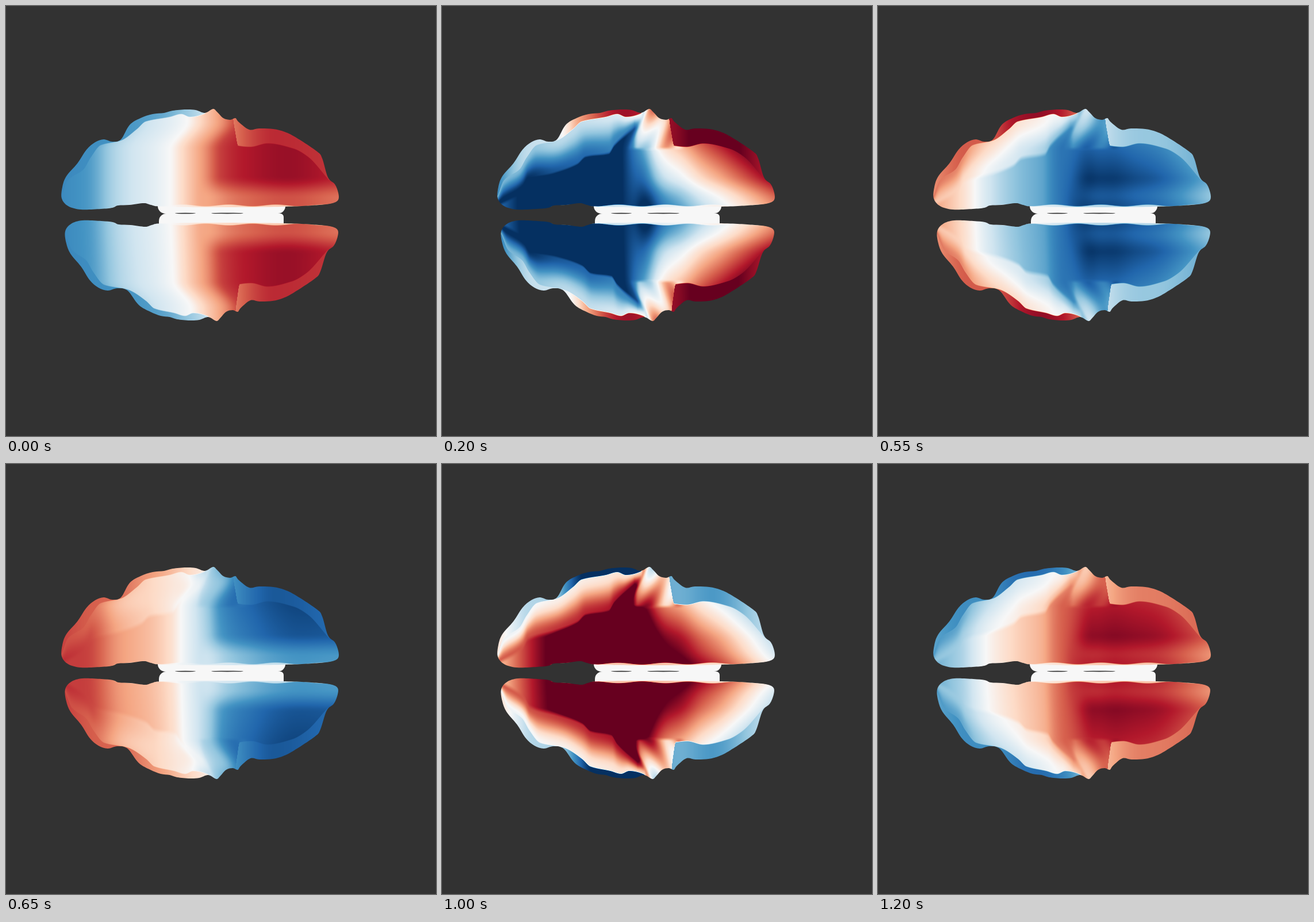
Animation, 748 px wide and 748 px high, one loop 1.25 s. Source, as an HTML page with a canvas:

```html
<!DOCTYPE html>
<html lang="en">
<head>
<meta charset="utf-8">
<title>Wave travelling over two hemispheres</title>
<style>
  html, body { margin: 0; width: 100%; height: 100%; overflow: hidden; background: #323232; }
  canvas { display: block; width: 748px; height: 748px; }
</style>
</head>
<body>
<canvas id="stage" width="748" height="748"></canvas>
<script>
const LOOP = 1250, STEP = 50, BG = '#323232', WHITE = '#f7f7f7';
const AXIS = 363.5, BOX = { x: 88, y: 172, w: 504, h: 384 };
const ctx = document.getElementById('stage').getContext('2d');

const mix = (a, b, t) => a + (b - a) * t;
const bell = t => Math.exp(-t * t);
const ramp = (from, to, v) => {
  const t = Math.max(0, Math.min(1, (v - from) / (to - from)));
  return t * t * (3 - 2 * t);
};

// Monotone cubic through a few [x, y] points
function track(...pts) {
  const rise = pts.slice(1).map((p, i) => (p[1] - pts[i][1]) / (p[0] - pts[i][0]));
  const slope = pts.map((_, i) => {
    const a = rise[i - 1] ?? rise[i], b = rise[i] ?? a;
    return a * b > 0 ? 2 * a * b / (a + b) : 0;
  });
  return x => {
    let i = 0;
    while (i < pts.length - 2 && x > pts[i + 1][0]) i++;
    const [x0, y0] = pts[i], [x1, y1] = pts[i + 1], h = x1 - x0;
    const t = Math.max(0, Math.min(1, (x - x0) / h)), u = 1 - t;
    return y0 * (1 + 2 * t) * u * u + y1 * t * t * (3 - 2 * t) + h * t * u * (slope[i] * u - slope[i + 1] * t);
  };
}

// Diverging colour scale, blue (-1) to red (+1)
const STOPS = ['053061', '2166ac', '4393c3', '92c5de', 'd1e5f0', 'f7f7f7',
  'fddbc7', 'f4a582', 'd6604d', 'b2182b', '67001f']
  .map(h => [0, 2, 4].map(i => parseInt(h.slice(i, i + 2), 16)));
const SHADES = 1001;
const palette = Uint32Array.from({ length: SHADES }, (_, i) => {
  const p = i / (SHADES - 1) * 10, k = Math.min(9, Math.floor(p));
  const [r, g, b] = STOPS[k].map((c, j) => Math.round(mix(c, STOPS[k + 1][j], p - k)));
  return (255 << 24 | b << 16 | g << 8 | r) >>> 0;
});

// Upper silhouette; the lower one is its mirror image, slightly skewed
const outline = [
  [97, 335], [98, 315], [105, 296], [124, 274], [140, 250], [155, 237], [170, 232], [185, 236],
  [200, 232], [215, 207], [234, 195], [255, 188], [275, 186], [290, 182], [313, 180], [330, 181],
  [346, 186], [360, 179], [367, 184], [378, 195], [390, 198], [399, 195], [405, 202], [423, 215],
  [440, 213], [465, 214], [485, 219], [505, 229], [541, 253], [550, 265], [560, 298], [572, 310],
  [578, 325], [578, 337], [568, 343], [545, 346], [486, 349], [360, 350], [272, 349], [252, 346],
  [240, 343], [215, 346], [195, 347], [185, 351], [165, 353], [130, 354], [108, 348]];
const skew = (x, y) => (AXIS - y) * (.035 * Math.tanh((450 - x) / 60) + .07 * bell((x - 225) / 45))
  + 5 * bell((x - 97) / 40);
const mirrored = outline.map(([x, y]) => [x + skew(x, y), 2 * AXIS - y]);

// Closed Catmull-Rom curve
function trace(path, pts) {
  const n = pts.length;
  path.moveTo(...pts[0]);
  pts.forEach((b, i) => {
    const a = pts[(i + n - 1) % n], c = pts[(i + 1) % n], d = pts[(i + 2) % n];
    path.bezierCurveTo(b[0] + (c[0] - a[0]) / 6, b[1] + (c[1] - a[1]) / 6,
      c[0] - (d[0] - b[0]) / 6, c[1] - (d[1] - b[1]) / 6, ...c);
  });
  path.closePath();
}
const silhouette = new Path2D();
trace(silhouette, outline);
trace(silhouette, mirrored);

// Contours of the relief: the crest hides the far side, the terrace bounds the plateau
const crest = track([97, 330], [108, 303], [135, 284], [147, 264], [165, 242], [200, 234],
  [228, 214], [243, 201], [285, 193], [305, 188], [320, 193], [346, 187], [353, 165], [390, 170],
  [398, 215], [404, 243], [425, 245], [455, 239], [500, 248], [525, 262], [562, 303]);
const terrace = track([97, 345], [140, 318], [150, 302], [195, 290], [235, 275], [250, 262],
  [290, 255], [300, 240], [335, 207]);

// Cosine and sine parts of the wave along x, for the near and the far side
const nearCos = track([97, -.64], [140, -.58], [195, -.28], [285, 0], [305, .18], [345, .45],
  [375, .7], [415, .8], [490, .87], [578, .78]);
const nearSin = track([97, -.5], [155, -1], [195, -1.25], [250, -1.5], [310, -1.35], [340, -1.17],
  [375, -1.06], [410, -.92], [450, -.62], [490, -.37], [578, .3]);
const farCos = track([97, -.65], [250, -.55], [340, -.25], [400, .55], [470, .75], [575, .72]);
const farSin = track([97, -.35], [150, .1], [190, .15], [240, .85], [310, 1.25], [400, .7],
  [470, .85], [575, .45]);

function wave(x, y) {
  const top = crest(x), edge = terrace(x), base = nearSin(x);
  const diagonal = x + (y - 180) / 2;

  let c = nearCos(x - 30 * ramp(250, 200, y));
  c -= .23 * ramp(330, 375, x) * ramp(295, 335, y);

  const flank = mix(-.15, -.85, ramp(0, 1, (y - top) / Math.max(10, edge - top)));
  const rear = mix(flank, base, ramp(-3, 8, y - edge));

  const folds = .3 * Math.cos((diagonal - 364) * Math.PI / 29)
    * ramp(330, 342, x) * ramp(425, 405, x) * ramp(252, 244, y);
  const ledge = .3 * bell((x - 355) / 22) * ramp(244, 253, y);
  const front = base + .0085 * ramp(310, 375, x) * (335 - y) + folds - ledge;

  let s = mix(rear, front, ramp(350, 362, diagonal));

  const far = ramp(-1, 1, top - y);
  c = mix(c, farCos(x), far);
  s = mix(s, farSin(x), far);

  // Pale lip along the inner border
  const lip = ramp(-1, 1, y - 347 - 1.5 * Math.sin(x / 13)) * ramp(186, 196, x);
  return [mix(c, c * .4, lip), mix(s, s * .2, lip)];
}

const sheet = document.createElement('canvas');
sheet.width = BOX.w;
sheet.height = BOX.h;
const pen = sheet.getContext('2d'), image = pen.createImageData(BOX.w, BOX.h);
const pixels = new Uint32Array(image.data.buffer);
const cosPart = new Float32Array(pixels.length), sinPart = new Float32Array(pixels.length);
for (let k = 0; k < pixels.length; k++) {
  let x = BOX.x + k % BOX.w + .5, y = BOX.y + Math.floor(k / BOX.w) + .5;
  if (y > AXIS) {
    y = 2 * AXIS - y;
    x -= skew(x - skew(x, y), y);
  }
  [cosPart[k], sinPart[k]] = wave(x, y);
}

function paintBridge() {
  ctx.fillStyle = WHITE;
  ctx.beginPath();
  ctx.roundRect(264, 338, 222, 23, [0, 0, 13, 13]);
  ctx.roundRect(266, 361, 217, 20, [13, 6, 0, 0]);
  ctx.fill();
  ctx.fillStyle = BG;
  for (const [x, r] of [[312, 18], [385, 28]]) {
    ctx.beginPath();
    ctx.ellipse(x, 360.6, r, .8, 0, 0, 2 * Math.PI);
    ctx.fill();
  }
}

let shown = -1;
function draw() {
  const step = Math.floor(performance.now() % LOOP / STEP);
  if (step !== shown) {
    shown = step;
    const angle = 2 * Math.PI * step * STEP / LOOP;
    const c = Math.cos(angle), s = Math.sin(angle);
    for (let k = 0; k < pixels.length; k++) {
      const v = Math.max(-1, Math.min(1, cosPart[k] * c + sinPart[k] * s));
      pixels[k] = palette[Math.round((v + 1) / 2 * (SHADES - 1))];
    }
    pen.putImageData(image, 0, 0);

    ctx.fillStyle = BG;
    ctx.fillRect(0, 0, 748, 748);
    paintBridge();
    ctx.save();
    ctx.clip(silhouette);
    ctx.drawImage(sheet, BOX.x, BOX.y);
    ctx.restore();
  }
  requestAnimationFrame(draw);
}
draw();
</script>
</body>
</html>
```
